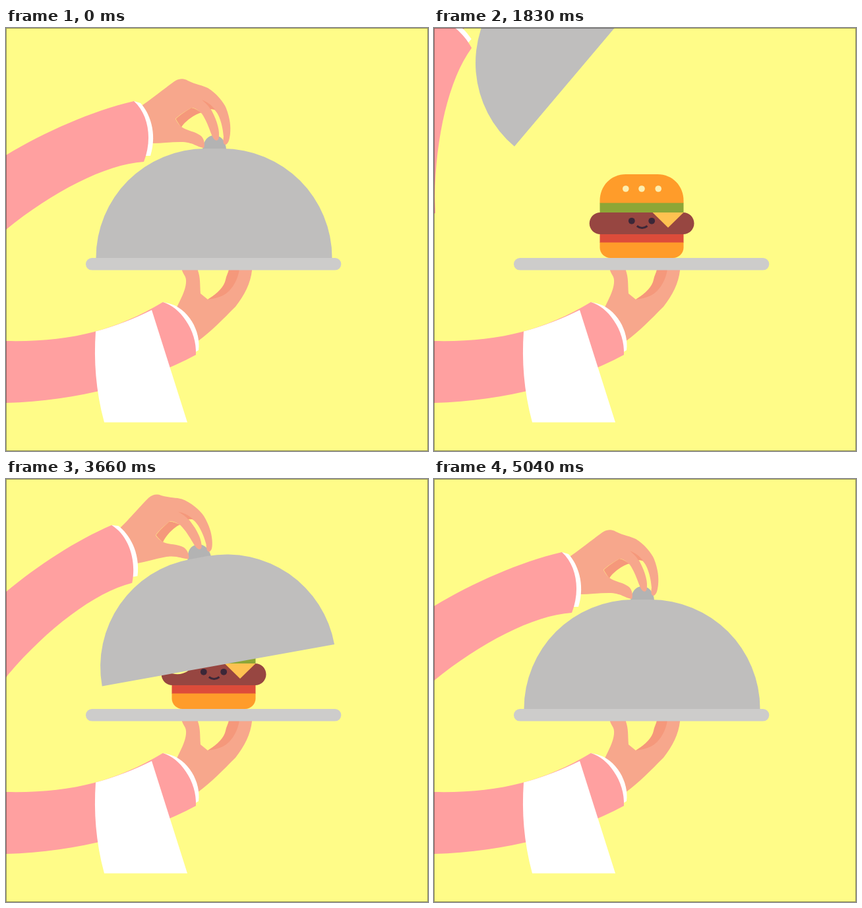
Write an HTML page with a canvas that moves like this. It is 640 px wide and 642 px high and loops after 5.64 s.

```html
<!DOCTYPE html>
<html lang="en">
<head>
<meta charset="utf-8">
<title>Cloche</title>
<style>
  html, body { margin: 0; width: 100%; height: 100%; overflow: hidden; background: #fffc88; }
  canvas { display: block; width: 100vw; height: 100vh; }
</style>
</head>
<body>
<canvas id="stage" width="640" height="642"></canvas>
<script>
const W = 640, H = 642, LOOP = 5640, STEP = 30;
const ctx = document.getElementById('stage').getContext('2d');

const C = {
  bg: '#fffc88', sleeve: '#ffa0a0', skin: '#f7a78c', shade: '#f5987b', white: '#ffffff',
  dome: '#bfbebd', knob: '#b3b3b3', tray: '#cdcccb',
  bun: '#ff9c2a', lettuce: '#8da636', patty: '#974641', tomato: '#dd4c3a',
  cheese: '#fec251', seed: '#fceeb0', face: '#3b2738'
};

// The lid and the arm that holds it swing together around this point.
const PIVOT = { x: -52.8, y: 280.1 };
const OPEN = 50;

// Each move: start, end, angle at start, angle at end.
const MOVES = [
  [0, 900, 0, OPEN],
  [1800, 2700, OPEN, 0],
  [3390, 4320, 0, OPEN],
  [4500, 5040, OPEN, 0]
];

// The bitten burger is swapped in and out while the lid is down.
const BITTEN = [3000, 5300];

const upperArm = [
  [C.white, 'M194 111 L204 114 C217 128 230 158 219 194 L205 194 Z'],
  [C.sleeve, 'M194 111 C130 126 60 157 0 193 L-85 243 L-18.3 322.7 L0 306 C70 249 150 207 209 203 C222 170 217 132 194 111 Z']
];

const upperHand = [
  [C.skin, `M204 119 C222 107 245 88 257 80 C263 76.500 270 76 276 80 C288 86 298 87 306 91
    C318 98 330 112 334 122 C340 138 341 150 340 160 C339 170 337 176 333 177
    C329 177 329 171 330 165 C329 150 324 131 316 124 L310 122 C318 136 324 152 323 164
    C323 170 320 172 317 170 C311 166 309 148 297 130 C293 126 287 121 281 121
    C275 125 262 132 257 138 C260 144 263 147 266 150 C274 156 288 157 296 164
    C301 169 302 178 300 182 C290 181 284 173 265 173 C250 173 235 175 222 175 Z`],
  [C.shade, 'M257.500 138 C263 132 275 125 281 121 C287 122 291 125 296 128.500 C286 131 271 142 266 150.500 C263 147 260 143 257.500 138 Z'],
  [C.shade, 'M297 109 C305 112 312 117 317 124 L310 123 C307 118 302 113 297 109 Z']
];

const lid = [
  [C.knob, 'M298 184 C300 170 306 163 316 163 C326 163 333 171 334 184 Z'],
  [C.dome, 'M136.500 349 A166 166 0 0 1 302.500 183 H328.500 A166 166 0 0 1 494.500 349 Z']
];

const lowerArm = [
  [C.skin, `M267 360 V368 C270 376 274 377 273 387 C272 399 265 411 259 424 L290 476
    C312 460 328 443 348 423 C362 405 371 387 373 368 V360 H340 V390 L306 412 L295 403
    C294 390 295 379 291 368 V360 Z`],
  [C.shade, 'M306 412 C322 402 331 392 333 382 C334 376 337 372 338 366 H354 C352 381 344 395 335 402 C326 409 314 411 306 412 Z'],
  [C.white, 'M238 416 L247 418 C276 425 296 460 292 489 L285 493 Z'],
  [C.sleeve, 'M0 475 C95 477 165 460 238 416 C263 423 290 458 288 496 C210 538 110 566 0 569 Z'],
  [C.white, 'M136 460.500 C165 453 195 441 221 428 L275 598.500 H149 C136 550 133 505 136 460.500 Z']
];

const burger = [
  [C.bun, 'M251.500 266 V262 C251.500 240 268 222 291 222 H339 C362 222 378.500 240 378.500 262 V266 Z'],
  [C.lettuce, 'M251.500 265.500 H378.500 V281 H251.500 Z'],
  [C.tomato, 'M251.500 312 H378.500 V326 H251.500 Z'],
  [C.bun, 'M251.500 325.500 H378.500 V333 A16 16 0 0 1 362.500 349 H267.500 A16 16 0 0 1 251.500 333 Z'],
  [C.patty, 'M252.200 280 H378 A16.500 16.500 0 0 1 378 313 H252.200 A16.500 16.500 0 0 1 252.200 280 Z'],
  [C.cheese, 'M331.500 280 H378.500 L355 303 Z']
];

const tray = [[C.tray, 'M130.300 349 H499 A9.300 9.300 0 0 1 499 367.600 H130.300 A9.300 9.300 0 0 1 130.300 349 Z']];

const compile = parts => parts.map(([color, d]) => [color, new Path2D(d)]);
const art = {
  arm: compile(upperArm), hand: compile(upperHand), lid: compile(lid),
  lower: compile(lowerArm), burger: compile(burger), tray: compile(tray)
};

function paint(parts) {
  for (const [color, path] of parts) {
    ctx.fillStyle = color;
    ctx.fill(path);
  }
}

function dots(color, r, y, xs) {
  ctx.fillStyle = color;
  for (const x of xs) {
    ctx.beginPath();
    ctx.arc(x, y, r, 0, Math.PI * 2);
    ctx.fill();
  }
}

function clipBite() {
  ctx.beginPath();
  ctx.rect(0, 0, W, H);
  ctx.moveTo(328.5, 210);
  ctx.arc(300, 235, 28.3, 0, 2.05);
  ctx.arc(260, 268, 28.2, -0.29, 2.4);
  ctx.lineTo(220, 287);
  ctx.lineTo(220, 210);
  ctx.closePath();
  ctx.clip('evenodd');
}

function drawBurger(bitten) {
  ctx.save();
  if (bitten) clipBite();
  paint(art.burger);
  dots(C.seed, 4.8, 244, [290.8, 315, 340.2]);
  ctx.restore();
  dots(C.face, 4.9, 292.8, [299.8, 330.2]);
  ctx.strokeStyle = C.face;
  ctx.lineWidth = 3;
  ctx.beginPath();
  ctx.moveTo(307.8, 300.5);
  ctx.quadraticCurveTo(315.5, 306.5, 323.5, 300.5);
  ctx.stroke();
}

const smooth = p => p * p * (3 - 2 * p);

function lidAngle(t) {
  let angle = 0;
  for (const [start, end, from, to] of MOVES) {
    if (t < start) break;
    const p = Math.min(1, (t - start) / (end - start));
    angle = from + (to - from) * smooth(p);
  }
  return angle;
}

function draw(t) {
  ctx.fillStyle = C.bg;
  ctx.fillRect(0, 0, W, H);
  paint(art.lower);
  drawBurger(t >= BITTEN[0] && t < BITTEN[1]);
  paint(art.tray);

  ctx.save();
  ctx.translate(PIVOT.x, PIVOT.y);
  ctx.rotate(-lidAngle(t) * Math.PI / 180);
  ctx.translate(-PIVOT.x, -PIVOT.y);
  paint(art.lid);
  paint(art.hand);
  paint(art.arm);
  ctx.restore();

  ctx.strokeStyle = 'rgba(0, 0, 0, 0.4)';
  ctx.lineWidth = 1;
  ctx.strokeRect(0.5, 0.5, W - 1, H - 1);
}

const begin = performance.now();
function tick() {
  const t = (performance.now() - begin) % LOOP;
  draw(Math.floor(t / STEP) * STEP);
  requestAnimationFrame(tick);
}
tick();
</script>
</body>
</html>
```
